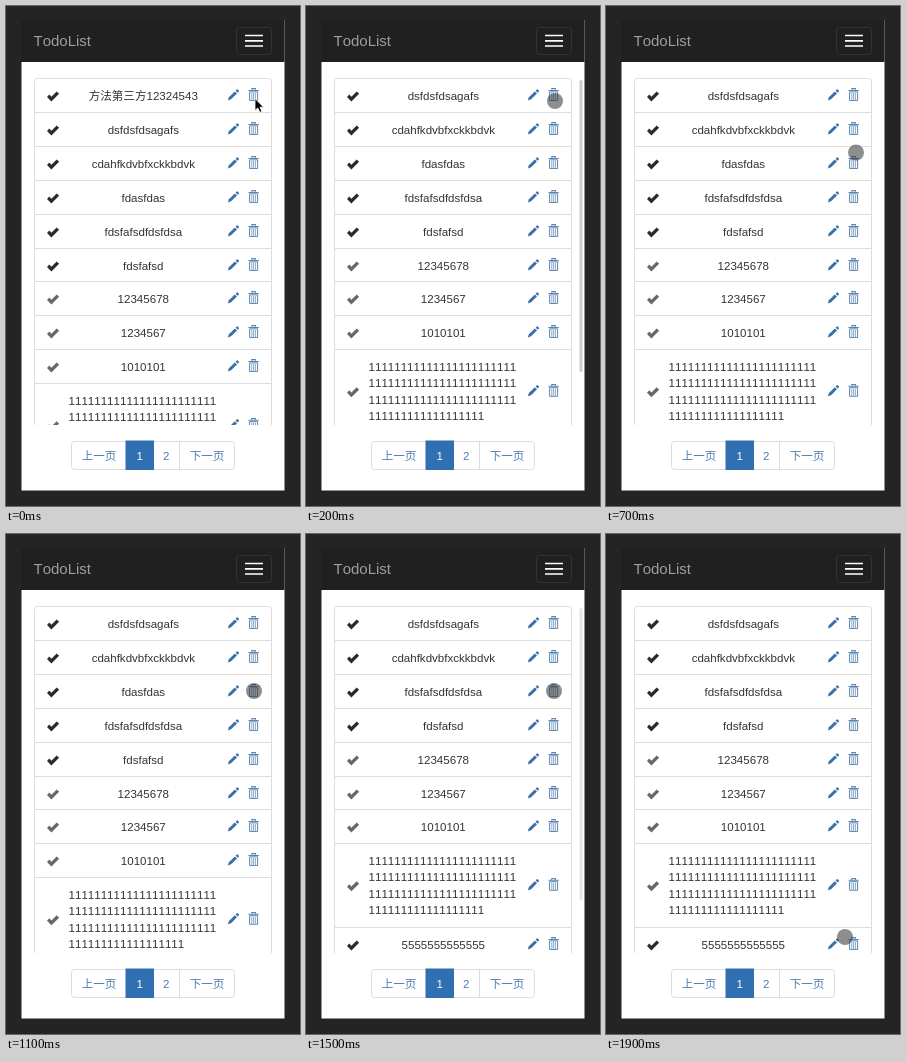
Animation, 294 px wide and 500 px high, one loop 2000 ms. Source, as an HTML page:

```html
<!DOCTYPE html>
<html lang="zh">
<head>
<meta charset="utf-8">
<title>TodoList</title>
<style>
  html, body { margin: 0; width: 100%; height: 100%; overflow: hidden; background: #252326; }
  svg { display: block; width: 100%; height: 100%; }
  text { font: 11.55px "Liberation Sans", "Noto Sans CJK SC", "Noto Sans CJK", sans-serif; font-kerning: none; fill: #333; }
  .mid { text-anchor: middle; }
  .brand { font-size: 15px; fill: #9d9d9d; }
  .link { fill: #4f7db0; }
  .line { fill: none; stroke: #ddd; }
</style>
</head>
<body>
<svg viewBox="0 0 294 500">
  <defs>
    <clipPath id="view"><rect x="15" y="56" width="263" height="363"/></clipPath>
    <path id="check" d="M-6 .6L-3.7 -1.8L-1.6 .3L3.7 -4.8L6.1 -2.5L-1.6 5.2Z"/>
    <g id="pencil" fill="#3a70a8">
      <path d="M-5.7 5.6L-4.6 2.4L1.3 -3.4L3.5 -1.3L-2.4 4.5Z"/>
      <path d="M2.1 -4.2L3.3 -5.4Q3.8 -5.8 4.3 -5.3L5.4 -4.2Q5.8 -3.7 5.4 -3.3L4.3 -2.1Z"/>
    </g>
    <g id="trash" fill="none" stroke="#5a86b0">
      <path d="M-1.8 -5V-6.2H1.8V-5M-5.2 -4.4H5.2" stroke-width="1.1"/>
      <path d="M-4 -3V5.6H4V-3Z"/>
      <path d="M-1.8 -2V5M0 -2V5M1.8 -2V5" stroke-width=".7"/>
    </g>
  </defs>
  <rect width="294" height="500" fill="#252326"/>
  <rect x="15.5" y="14" width="263" height="470.5" fill="#fff"/>
  <rect x="15" y="14" width="263.5" height="42" fill="#202020"/>
  <text class="brand" x="27.5" y="40">TodoList</text>
  <rect x="230.5" y="21.5" width="35" height="27" rx="3" fill="none" stroke="#333"/>
  <path d="M239 29.5H257M239 34.8H257M239 40H257" stroke="#fff" stroke-width="1.7"/>

  <g clip-path="url(#view)">
    <rect class="line" x="28.5" y="72.5" width="237" height="420" rx="3"/>
    <g id="list"></g>
  </g>
  <rect id="bar" x="273.5" y="74" width="3" height="292" rx="1.5" fill="#ccc"/>

  <rect class="line" x="65.5" y="435.5" width="163" height="28" rx="3"/>
  <path class="line" d="M173.5 435V464"/>
  <rect x="119.5" y="434.5" width="28.5" height="29.5" fill="#2f6fb2"/>
  <text class="mid link" x="93" y="454">上一页</text>
  <text class="mid" x="133.8" y="454" style="fill:#fff">1</text>
  <text class="mid link" x="160.3" y="454">2</text>
  <text class="mid link" x="201" y="454">下一页</text>

  <circle id="touch" r="8" fill="#3c3c3c" fill-opacity=".58"/>
  <path id="arrow" d="M249 92.5V104.5L251.8 102L253.8 106.3L255.9 105.4L254 101.2H257.6Z" fill="#000" stroke="#fff" stroke-width=".8"/>
</svg>
<script>
const LOOP = 2000, STEP = 100, TOP = 72, ROW = 33.9, TALL = 83.5;
const DELETES = [100, 1200];
const $ = id => document.getElementById(id);
const ones = n => '1'.repeat(n);

const items = [
  { text: '方法第三方12324543', gone: DELETES[0] },
  { text: 'dsfdsfdsagafs' },
  { text: 'cdahfkdvbfxckkbdvk' },
  { text: 'fdasfdas', gone: DELETES[1] },
  { text: 'fdsfafsdfdsfdsa' },
  { text: 'fdsfafsd' },
  { text: '12345678', done: true },
  { text: '1234567', done: true },
  { text: '1010101', done: true },
  { lines: [ones(23), ones(23), ones(23), ones(18)], done: true },
  { text: '5555555555555' }
];

// Touch path: time, x, y
const path = [
  [100, 249, 95], [200, 249, 95], [400, 252, 148], [500, 252, 154],
  [700, 250, 146.5], [1000, 248, 157], [1500, 248, 157], [1900, 239, 403]
];

function rowMarkup({ text, lines, done }) {
  const h = lines ? TALL : ROW, mid = h / 2;
  const label = lines
    ? lines.map((s, i) => `<text x="62.6" y="${21.6 + i * 16.6}">${s}</text>`).join('')
    : `<text class="mid" x="137.3" y="21.8">${text}</text>`;
  return `${label}
    <use href="#check" x="47" y="${mid + 1.4}" fill="${done ? '#676968' : '#2b2b2b'}"/>
    <use href="#pencil" x="227.5" y="${mid - .1}"/>
    <use href="#trash" x="247.6" y="${mid - .1}"/>
    <path class="line" d="M29 .5H265"/>`;
}

for (const item of items) {
  item.node = document.createElementNS('http://www.w3.org/2000/svg', 'g');
  item.node.innerHTML = rowMarkup(item);
  $('list').append(item.node);
}

function touchAt(t) {
  const i = Math.max(1, path.findIndex(p => p[0] >= t));
  const [t0, x0, y0] = path[i - 1], [t1, x1, y1] = path[i];
  const k = Math.max(0, (t - t0) / (t1 - t0)), e = k * k * (3 - 2 * k);
  return [x0 + (x1 - x0) * e, y0 + (y1 - y0) * e];
}

function barOpacity(t) {
  const age = Math.min(...DELETES.map(d => t >= d ? t - d : LOOP));
  return Math.max(0, Math.min(1, (500 - age) / 400));
}

function render(time) {
  const t = Math.floor(time % LOOP / STEP) * STEP;
  let y = TOP;
  for (const { node, lines, gone = LOOP } of items) {
    const shown = t < gone;
    node.style.display = shown ? '' : 'none';
    node.lastElementChild.style.display = y > TOP ? '' : 'none';
    node.setAttribute('transform', `translate(0 ${Math.round(y)})`);
    if (shown) y += lines ? TALL : ROW;
  }
  const [cx, cy] = touchAt(t), pointer = t < STEP;
  $('touch').setAttribute('cx', cx);
  $('touch').setAttribute('cy', cy);
  $('touch').style.display = pointer ? 'none' : '';
  $('arrow').style.display = pointer ? '' : 'none';
  $('bar').style.opacity = barOpacity(t);
}

const start = performance.now();
function tick() {
  render(performance.now() - start);
  requestAnimationFrame(tick);
}
tick();
</script>
</body>
</html>
```
